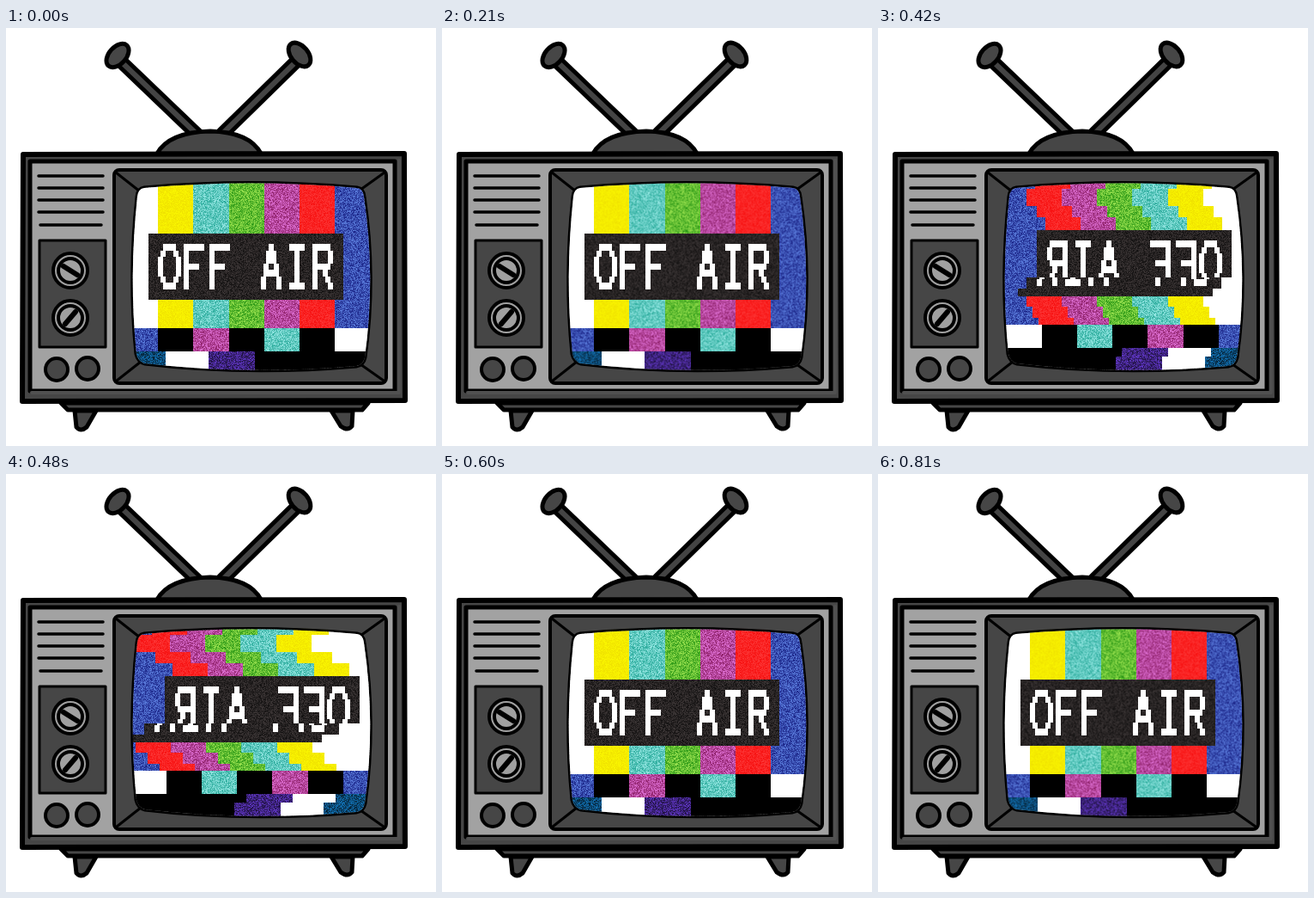
These frames come from a looping animation (501x486 px, 0.84 s). An HTML page with a canvas:

```html
<!DOCTYPE html>
<html lang="en">
<head>
<meta charset="utf-8">
<title>Off air</title>
<style>
  html, body { margin: 0; width: 100%; height: 100%; overflow: hidden; background: #fff; }
  svg, canvas { position: absolute; left: 0; top: 0; }
</style>
</head>
<body>
<svg width="501" height="486" stroke="#000" stroke-width="4" stroke-linecap="round" stroke-linejoin="round" fill="#464646">
  <!-- antennas -->
  <path d="M134 39L224 125M339 38L252 123" stroke-width="16"/>
  <path d="M134 39L224 125M339 38L252 123" stroke="#444" stroke-width="6"/>
  <ellipse cx="130" cy="32" rx="16" ry="10" transform="rotate(-48 130 32)" stroke-width="5"/>
  <ellipse cx="342" cy="31" rx="16" ry="10" transform="rotate(50 342 31)" stroke-width="5"/>
  <path d="M176 146Q190 121 238 120Q284 121 297 146Z" stroke-width="5"/>
  <!-- base and feet -->
  <path d="M80 445L82 464Q87 470 94 464L105 445ZM379 445L390 463Q398 469 403 463L404 445Z" stroke-width="5"/>
  <path d="M64 436H422L415 444H72Z" stroke-width="5"/>
  <!-- cabinet -->
  <path d="M20 147L464 146L465 433L19 434Z" stroke-width="6"/>
  <path d="M28 155H453V422H28Z" fill="#a2a2a2" stroke-width="5"/>
  <path d="M30 424H458V154" fill="none" stroke="#505050" stroke-width="4"/>
  <path d="M38 172H113M38 186H113M38 200H113M38 214H113M40 229H111" stroke-width="3.5"/>
  <path d="M39 247H116V371H39Z" stroke-width="3"/>
  <g id="dials">
    <circle cx="75" cy="282" r="20" fill="#a0a0a0"/>
    <circle cx="75" cy="282" r="14" fill="#a0a0a0"/>
    <path d="M67 277L83 287" stroke-width="6"/>
    <circle cx="75" cy="337" r="20" fill="#a0a0a0"/>
    <circle cx="75" cy="337" r="14" fill="#a0a0a0"/>
    <path d="M69 344L81 330" stroke-width="6"/>
    <circle cx="59" cy="397" r="13"/>
    <circle cx="95" cy="396" r="13"/>
  </g>
  <!-- bezel -->
  <rect x="126" y="165" width="317" height="248" rx="6"/>
  <path d="M128 168L156 190M441 168L413 188M129 410L157 388M440 410L413 391" stroke-width="3"/>
  <path id="glass" stroke-width="5" d="M161 186Q285 175 409 186Q416 187 417 196Q431 290 418 383Q416 392 408 393Q280 404 162 390Q154 388 152 379Q143 290 153 196Q154 187 161 186Z"/>
</svg>
<canvas id="screen" width="501" height="486"></canvas>
<script>
const W = 501, H = 486, TOP = 178, BOTTOM = 404;
const ctx = document.getElementById('screen').getContext('2d');
const glass = new Path2D(document.getElementById('glass').getAttribute('d'));

const hash = (a, b, c) => {
  let h = Math.imul(a + 11, 374761393) ^ Math.imul(b + 7, 668265263) ^ Math.imul(c + 3, 1274126177);
  h = Math.imul(h ^ h >>> 13, 1103515245);
  h = Math.imul(h ^ h >>> 16, 2246822519);
  return ((h ^ h >>> 15) >>> 0) / 4294967296;
};

function layer(paint) {
  const c = document.createElement('canvas');
  c.width = W;
  c.height = H;
  paint(c.getContext('2d'));
  return c;
}

// Glyph rows as bits; each dot is two columns wide
const glyphs = {
  O: [0x3C, 0x42, 0x81, 0x81, 0x81, 0x42, 0x3C],
  F: [0xFE, 0x80, 0x80, 0xF8, 0x80, 0x80, 0x80],
  A: [0x10, 0x28, 0x28, 0x44, 0x7C, 0x82, 0x82],
  I: [0x7C, 0x10, 0x10, 0x10, 0x10, 0x10, 0x7C],
  R: [0xFC, 0x82, 0x82, 0xFC, 0x88, 0x84, 0x82]
};

const card = layer(g => {
  const WHITE = '#fff', BLACK = '#000', YELLOW = '#f5ec00', TEAL = '#5fc9bf',
    GREEN = '#62bd32', MAGENTA = '#b7489f', RED = '#fa2222', BLUE = '#3a50b2';
  const edges = [0, 177, 218, 260, 301, 342, 383];
  const row = (y, colors, xs = edges) => colors.forEach((color, i) => {
    g.fillStyle = color;
    g.fillRect(xs[i], y, W, H);
  });
  row(0, [WHITE, YELLOW, TEAL, GREEN, MAGENTA, RED, BLUE]);
  row(349, [BLUE, BLACK, MAGENTA, BLACK, TEAL, BLACK, WHITE]);
  row(376, ['#0b4a76', WHITE, '#3e2380', BLACK], [0, 186, 236, 290]);
  g.fillStyle = '#272323';
  g.fillRect(166, 239, 227, 77);
  g.fillStyle = WHITE;
  [...'OFF AIR'].forEach((ch, i) => (glyphs[ch] || []).forEach((bits, r) => {
    const y = Math.round(251 + r * 7.5), next = Math.round(258.5 + r * 7.5);
    for (let c = 0; c < 8; c++)
      if (bits & 128 >> c) g.fillRect(177 + i * 30 + c * 3, y, 6, next - y);
  }));
});

// Overlay grain: fine on even seeds, softer on odd ones
const grain = [0, 1, 2, 3].map(seed => layer(g => {
  const img = g.createImageData(W, H);
  for (let y = TOP; y < BOTTOM; y++) for (let x = 140; x < 432; x++) {
    const n = (dx, dy) => hash(x + dx, y + dy, seed);
    const v = seed % 2 ? (n(0, 0) + n(1, 0) + n(0, 1) + n(1, 1)) / 4 : n(0, 0);
    const i = (y * W + x) * 4;
    img.data.fill(128 + (v - .5) * 150, i, i + 3);
    img.data[i + 3] = 255;
  }
  g.putImageData(img, 0, 0);
}));

// Top edge and shift of each slipped band
const bands = [[178, -25], [187, -45], [207, -21], [220, -1], [235, 0], [290, -24],
  [303, -44], [324, -30], [337, -16], [345, -8], [382, -22], [404, 0]];

function strip(y, h, shift, mirrored) {
  const rise = mirrored ? 4 : 0;
  ctx.save();
  if (mirrored) ctx.transform(-1, 0, 0, 1, 578 + shift, 0);
  else ctx.translate(shift, 0);
  ctx.drawImage(card, 0, y + rise, W, h, 0, y, W, h);
  ctx.restore();
}

function tear(frame) {
  const bump = (y, center) => Math.exp(-(((y - center) / 18) ** 2));
  for (let y = TOP; y < BOTTOM; y += 4) {
    const inText = y > 248 && y < 306;
    const jitter = (hash(y, frame, 5) - .5) * (inText ? 16 : 6);
    strip(y, 4, Math.round(-6 + 8 * bump(y, 278) - 8 * bump(y, 345) + jitter), false);
  }
}

function flip(frame) {
  const slip = [.5, .75, 1, .6][frame - 14];
  for (let i = 0; i < bands.length - 1; i++) {
    const [y, shift] = bands[i];
    strip(y, bands[i + 1][0] - y, Math.round(shift * slip), true);
  }
}

function draw() {
  const frame = Math.floor(performance.now() % 840 / 30);
  ctx.clearRect(0, 0, W, H);
  ctx.save();
  ctx.clip(glass);
  if (frame >= 9 && frame < 14) tear(frame);
  else if (frame >= 14 && frame < 18) flip(frame);
  else ctx.drawImage(card, 0, 0);
  ctx.globalCompositeOperation = 'overlay';
  ctx.drawImage(grain[frame % 4], 0, 0);
  ctx.restore();
  requestAnimationFrame(draw);
}
draw();
</script>
</body>
</html>
```
